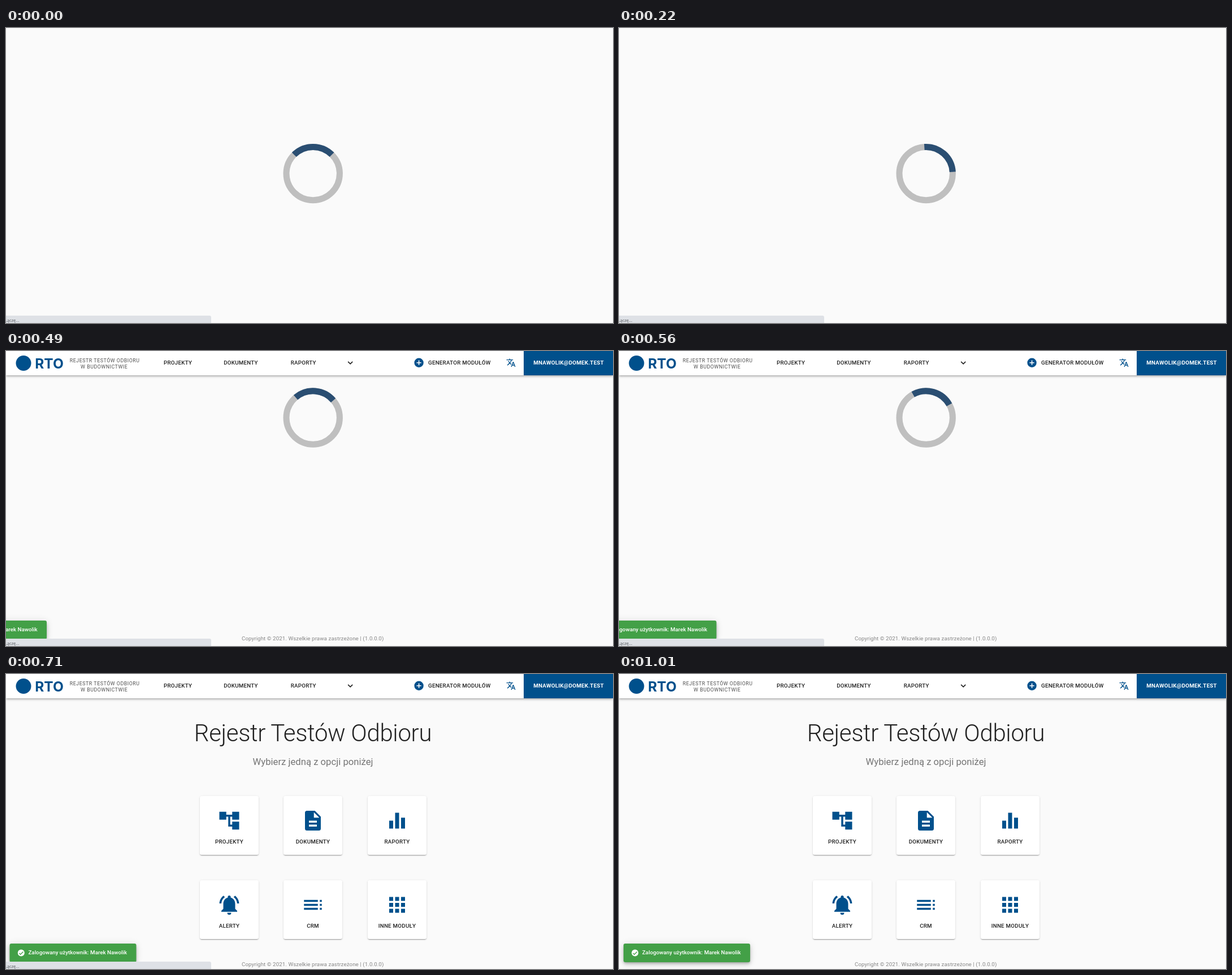
An HTML page that plays this animation: 1074x522 px, repeating every 1.48 s.

```html
<!DOCTYPE html>
<html lang="pl">
<head>
<meta charset="utf-8">
<title>Panel</title>
<style>
  html, body { margin: 0; width: 100%; height: 100%; overflow: hidden; background: #fafafa; }
  #stage { position: absolute; left: 0; top: 0; width: 1074px; height: 522px; overflow: hidden; background: #fafafa; }
  #stage div { position: absolute; }
  svg { position: absolute; left: 0; top: 0; overflow: visible; }
  text { font: 400 9.76px Roboto, sans-serif; fill: #212121; }
  .mid text, text.mid { text-anchor: middle; }
  .label { font-weight: 500; letter-spacing: .25px; }
  .claim { font-size: 8.8px; letter-spacing: .55px; fill: #505050; }
  .mark { font: 700 24.5px Inter, sans-serif; fill: #00508c; }
  .mail { font-weight: 700; letter-spacing: .25px; fill: #fff; }
  .title { font-size: 42px; font-weight: 300; letter-spacing: -.35px; }
  .sub { font-size: 16.7px; fill: #757575; }
  .copy { letter-spacing: .08px; fill: #868686; }
  .note { font-weight: 500; fill: #fff; }
  .blue { fill: #00508c; }
  #bar { left: 0; top: 0; width: 1074px; height: 43px; background: #fff;
    box-shadow: 0 1.4px 2.8px -.7px rgba(0,0,0,.2), 0 2.8px 3.5px rgba(0,0,0,.14), 0 .7px 7px rgba(0,0,0,.12); }
  #user { left: 916px; top: 0; width: 158px; height: 43px; background: #00508c; }
  .card { width: 104px; height: 104px; border-radius: 3px; background: #fff;
    box-shadow: 0 2.1px .7px -1.4px rgba(0,0,0,.2), 0 1.4px 1.4px rgba(0,0,0,.14), 0 .7px 3.5px rgba(0,0,0,.12); }
  #toast { left: 8px; top: 477px; width: 224px; height: 33px; border-radius: 3px; background: #43a047;
    box-shadow: 0 2.1px 3.5px -.7px rgba(0,0,0,.2), 0 4.2px 7px rgba(0,0,0,.14), 0 .7px 12.6px rgba(0,0,0,.12); }
  #status { left: 0; top: 508.5px; width: 363px; height: 13.5px; border-radius: 0 3px 0 0; background: #dee1e6; }
  #status text { font: 400 7.6px "Open Sans", sans-serif; text-anchor: end; fill: #4a4d52; }
</style>
</head>
<body>
<div id="stage">
  <svg id="spinner" width="1074" height="522" fill="none" stroke-width="11">
    <g id="ring">
      <circle r="47.2" stroke="#bfbfbf"/>
      <path id="arc" d="M-33.38-33.38A47.2 47.2 0 0 1 33.38-33.38" stroke="#2a4e72"/>
    </g>
  </svg>

  <div id="page">
    <svg class="mid" width="1074" height="522">
      <text class="title" x="543" y="119.3">Rejestr Testów Odbioru</text>
      <text class="sub" x="543" y="160.5">Wybierz jedną z opcji poniżej</text>
    </svg>
  </div>

  <div id="app">
    <div id="bar"></div>
    <div id="user"></div>
    <svg class="mid" width="1074" height="522">
      <circle class="blue" cx="31" cy="21.5" r="13.5"/>
      <text class="mark" x="76.5" y="30.7">RTO</text>
      <text class="claim" x="174.7" y="20.2">REJESTR TESTÓW ODBIORU</text>
      <text class="claim" x="173.7" y="31.4">W BUDOWNICTWIE</text>
      <text class="label" x="304.1" y="23.8">PROJEKTY</text>
      <text class="label" x="415.5" y="23.8">DOKUMENTY</text>
      <text class="label" x="526.2" y="23.8">RAPORTY</text>
      <path d="M605.2 18.9l4 4 4-4" fill="none" stroke="#212121" stroke-width="1.6"/>
      <circle class="blue" cx="730.6" cy="20.7" r="8.2"/>
      <path d="M726.5 20.7h8.2m-4.1-4.1v8.2" stroke="#fff" stroke-width="1.6"/>
      <text class="label" x="802.3" y="23.8">GENERATOR MODUŁÓW</text>
      <path class="blue" transform="translate(884.8 12) scale(.725)" d="M12.87 15.07l-2.54-2.51.03-.03c1.74-1.94 2.98-4.17 3.71-6.53H17V4h-7V2H8v2H1v2h11.17C11.5 7.92 10.44 9.75 9 11.35 8.07 10.32 7.3 9.19 6.69 8h-2c.73 1.63 1.73 3.17 2.98 4.56l-5.09 5.02L4 19l5-5 3.11 3.11zM18.5 10h-2L12 22h2l1.12-3h4.75L21 22h2zm-2.62 7l1.62-4.33L19.12 17z"/>
      <text class="mail" x="995.6" y="23.8">MNAWOLIK@DOMEK.TEST</text>
      <text class="copy" id="copy" x="542.7" y="511.8">Copyright © 2021. Wszelkie prawa zastrzeżone | (1.0.0.0)</text>
    </svg>
    <div id="toast">
      <svg width="224" height="33">
        <circle cx="20.3" cy="16.5" r="6" fill="#fff"/>
        <path d="M16.7 16.9l2.4 2.4 4.8-4.8" fill="none" stroke="#43a047" stroke-width="1.3"/>
        <text class="note" x="33" y="19.4">Zalogowany użytkownik: Marek Nawolik</text>
      </svg>
    </div>
  </div>

  <div id="status"><svg width="363" height="14"><text x="23.4" y="11.3">Łączę...</text></svg></div>
</div>

<script>
const $ = id => document.getElementById(id);
const LOOP = 1480, APP = 490, PAGE = 710;

const grid = [4, 10, 16].map(y => [4, 10, 16].map(x => `M${x} ${y}h4v4h-4z`).join('')).join('');
const rows = [7, 11, 15].map(y => `M3 ${y}h14v2H3zM19 ${y}h2v2h-2z`).join('');
const cards = [
  ['PROJEKTY', 'M22 11V3h-7v3H9V3H2v8h7V8h2v10h4v3h7v-8h-7v3h-2V8h2v3z'],
  ['DOKUMENTY', 'M14 2H6Q4 2 4 4v16q0 2 2 2h12q2 0 2-2V8zm2 16H8v-2h8zm0-4H8v-2h8zm-3-5V3.5L18.5 9z'],
  ['RAPORTY', 'M10 20h4V4h-4zM4 20h4v-8H4zM16 20h4V9h-4z'],
  ['ALERTY', 'M7.58 4.08L6.15 2.65C3.75 4.48 2.17 7.3 2.03 10.5h2c.15-2.65 1.51-4.97 3.55-6.42z' +
    'm12.39 6.42h2c-.15-3.2-1.73-6.02-4.12-7.85l-1.42 1.43c2.02 1.45 3.39 3.77 3.54 6.42z' +
    'M18 11c0-3.07-1.64-5.64-4.5-6.32V4a1.5 1.5 0 0 0-3 0v.68C7.63 5.36 6 7.92 6 11v5l-2 2v1h16v-1l-2-2z' +
    'M10 20a2 2 0 0 0 4 0z'],
  ['CRM', rows],
  ['INNE MODUŁY', grid]
];
$('page').insertAdjacentHTML('beforeend', cards.map(([name, icon], i) => {
  const x = 342.8 + i % 3 * 148.4, y = 216 + (i > 2) * 148.6;
  return `<div class="card" style="left:${x}px;top:${y}px"><svg width="104" height="104">
    <path class="blue" fill-rule="evenodd" transform="translate(31 22.5) scale(1.75)" d="${icon}"/>
    <text class="label mid" x="52" y="84">${name}</text></svg></div>`;
}).join(''));

const ticks = [0, 80, 150, 220, 300, 380, 490, 560, 630, 710, 780, 860, 930, 1010];
const hold = t => ticks.filter(k => k <= t).pop();
const show = (id, on) => { $(id).style.display = on ? '' : 'none'; };
const clamp = v => Math.max(0, Math.min(1, v));

function draw(t) {
  const inApp = t >= APP, inPage = t >= PAGE;
  show('app', inApp);
  show('page', inPage);
  show('spinner', !inPage);

  const angle = inApp ? 4.5 + (t - APP) * .163 : t * .1885;
  $('ring').setAttribute('transform', `translate(543.2 ${inApp ? 118 : 257.6})`);
  $('arc').setAttribute('transform', `rotate(${angle})`);

  const left = clamp((810 - t) / 320);
  $('toast').style.transform = `translateX(${-160 * left ** 4}px)`;
  $('copy').setAttribute('y', inPage ? 517.3 : 511.8);
  $('status').style.opacity = clamp((1010 - t) / 230);
}

const start = performance.now();
function tick() {
  draw(hold((performance.now() - start) % LOOP));
  requestAnimationFrame(tick);
}
tick();
</script>
</body>
</html>
```
